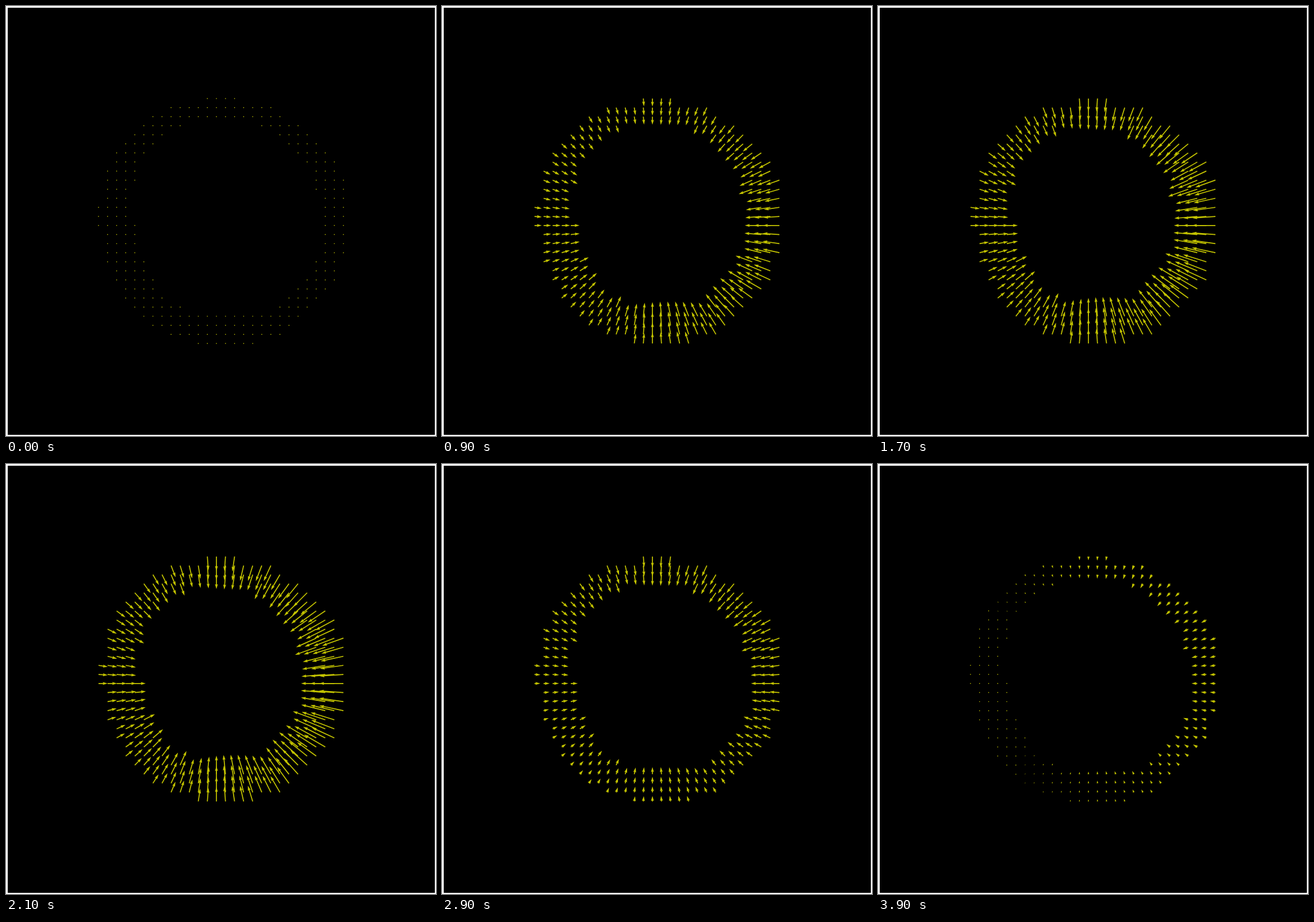
Write an HTML page with a canvas that moves like this. It is 748 by 748 pixels and loops after 4000 ms.

```html
<!DOCTYPE html>
<html lang="en">
<head>
<meta charset="utf-8">
<title>Ring motion field</title>
<style>
  html, body { margin: 0; width: 100%; height: 100%; overflow: hidden; background: #fff; }
  canvas { display: block; width: 748px; height: 748px; }
</style>
</head>
<body>
<canvas id="stage" width="748" height="748"></canvas>
<script>
const ctx = document.getElementById('stage').getContext('2d');
const LOOP = 4000, STEP = 100;
const ORIGIN = 160.9, PITCH = 15.78, CELLS = 28, SHAFT = 1.7;
const MIDDLE = 13.6;                  // centre of the ring outlines, in cells
const FOCUS = { col: 13, row: 14 };   // the point all arrows aim at

// Outline radii in cells, every 30 degrees counter-clockwise from the right.
const OUTER = [14.15, 14.16, 13.735, 13.79, 13.93, 14.1, 13.67, 13.62, 13.75, 13.77, 14, 14];
const INNER = [10.6, 11.15, 11.2, 11.35, 11.5, 10.7, 9.62, 9.35, 10.3, 10.25, 10.95, 11.18];

// Arrow length around the ring: mean, cos, sin, cos of 2x, sin of 2x.
const still = [0, 0, 0, 0, 0];
const contract = [20.5, 7, -5.4, 1.1, -1.6];
const squeeze = [26.3, 9.5, -5.2, 1.2, -1.6];
const peak = [29.5, 11.9, -3.8, 0.7, -1.1];
const release = [25.5, 8.7, 0, -0.5, 0.6];
const relaxed = [11.1, 0.9, 4.7, -0.5, 1.1];
const rest = [5.4, 4.9, 1, -0.3, 0.4];

const mix = (a, b, f) => a.map((v, i) => v + (b[i] - v) * f);
const KEYS = [
  [0, still], [600, mix(still, contract, 0.5)], [900, contract],
  [1300, squeeze], [2100, peak], [2500, release],
  [3000, mix(relaxed, release, 0.15)], [3200, relaxed], [3900, rest]
];

function hermite(a, b, ma, mb, f) {
  const g = 1 - f;
  return (1 + 2 * f) * g * g * a + f * g * g * ma
       + f * f * (3 - 2 * f) * b - f * f * g * mb;
}

function radiusAt(ring, angle) {
  const n = ring.length;
  const pos = (angle / (2 * Math.PI) + 1) * n, i = Math.floor(pos);
  const p = k => ring[(i + k + n) % n];
  return hermite(p(0), p(1), (p(1) - p(-1)) / 2, (p(2) - p(0)) / 2, pos - i);
}

function inRing(col, row) {
  const x = col - MIDDLE, y = MIDDLE - row;
  const r = Math.hypot(x, y), angle = Math.atan2(y, x);
  return r >= radiusAt(INNER, angle) && r <= radiusAt(OUTER, angle);
}

const points = [];
for (let row = 0; row < CELLS; row++) {
  for (let col = 0; col < CELLS; col++) {
    if (!inRing(col, row)) continue;
    const dx = col - FOCUS.col, dy = FOCUS.row - row;
    const angle = Math.atan2(dy, dx);
    // The lower left wall moves less towards its outer edge.
    const drop = 0.26 * Math.max(0, Math.cos(angle - 4 * Math.PI / 3));
    points.push({
      x: ORIGIN + PITCH * col,
      y: ORIGIN + PITCH * row,
      angle,
      gain: 1 - drop * (Math.hypot(dx, dy) - 9.9) / 3
    });
  }
}

// Tangent that never overshoots the keys.
function tangent(i, n) {
  if (i === 0 || i === KEYS.length - 1) return 0;
  const slope = j => (KEYS[j + 1][1][n] - KEYS[j][1][n]) / (KEYS[j + 1][0] - KEYS[j][0]);
  const a = slope(i - 1), b = slope(i);
  return a * b > 0 ? 2 * a * b / (a + b) : 0;
}

function poseAt(t) {
  let i = 0;
  while (i < KEYS.length - 2 && t >= KEYS[i + 1][0]) i++;
  const [t0, a] = KEYS[i], [t1, b] = KEYS[i + 1], span = t1 - t0;
  const f = Math.min(1, (t - t0) / span);
  return a.map((v, n) => hermite(v, b[n], tangent(i, n) * span, tangent(i + 1, n) * span, f));
}

function lengthAt([mean, c1, s1, c2, s2], { angle, gain }) {
  const wave = c1 * Math.cos(angle) + s1 * Math.sin(angle)
             + c2 * Math.cos(2 * angle) + s2 * Math.sin(2 * angle);
  return Math.max(0, (mean + wave) * gain);
}

function addPolygon(corners) {
  corners.forEach(([x, y], i) => i ? ctx.lineTo(x, y) : ctx.moveTo(x, y));
  ctx.closePath();
}

// Short arrows shrink as a whole; the shortest become hexagonal dots.
function addArrow({ x, y, angle }, length) {
  const len = length / SHAFT;
  if (len < 1) {
    addPolygon([0, 1, 2, 3, 4, 5].map(k => [
      x + SHAFT / 2 * Math.cos(k * Math.PI / 3),
      y + SHAFT / 2 * Math.sin(k * Math.PI / 3)
    ]));
    return;
  }
  const scale = SHAFT * Math.min(1, len / 5), tip = Math.max(len, 5);
  const c = -Math.cos(angle) * scale, s = Math.sin(angle) * scale;
  const outline = [
    [0, -0.5], [tip - 4.5, -0.5], [tip - 5, -1.5], [tip, 0],
    [tip - 5, 1.5], [tip - 4.5, 0.5], [0, 0.5]
  ];
  addPolygon(outline.map(([u, v]) => [x + u * c - v * s, y + u * s + v * c]));
}

function draw(t) {
  const pose = poseAt(t);
  ctx.fillStyle = '#fff';
  ctx.fillRect(0, 0, 748, 748);
  ctx.fillStyle = '#000';
  ctx.fillRect(3, 3, 743, 743);
  ctx.fillStyle = '#c4c400';
  for (const p of points) {
    ctx.beginPath();
    addArrow(p, lengthAt(pose, p));
    ctx.fill();
  }
}

const start = performance.now();
let shown = -1;
function tick() {
  const elapsed = Math.max(0, performance.now() - start) % LOOP;
  const t = Math.floor(elapsed / STEP) * STEP;
  if (t !== shown) draw(shown = t);
  requestAnimationFrame(tick);
}
tick();
</script>
</body>
</html>
```
